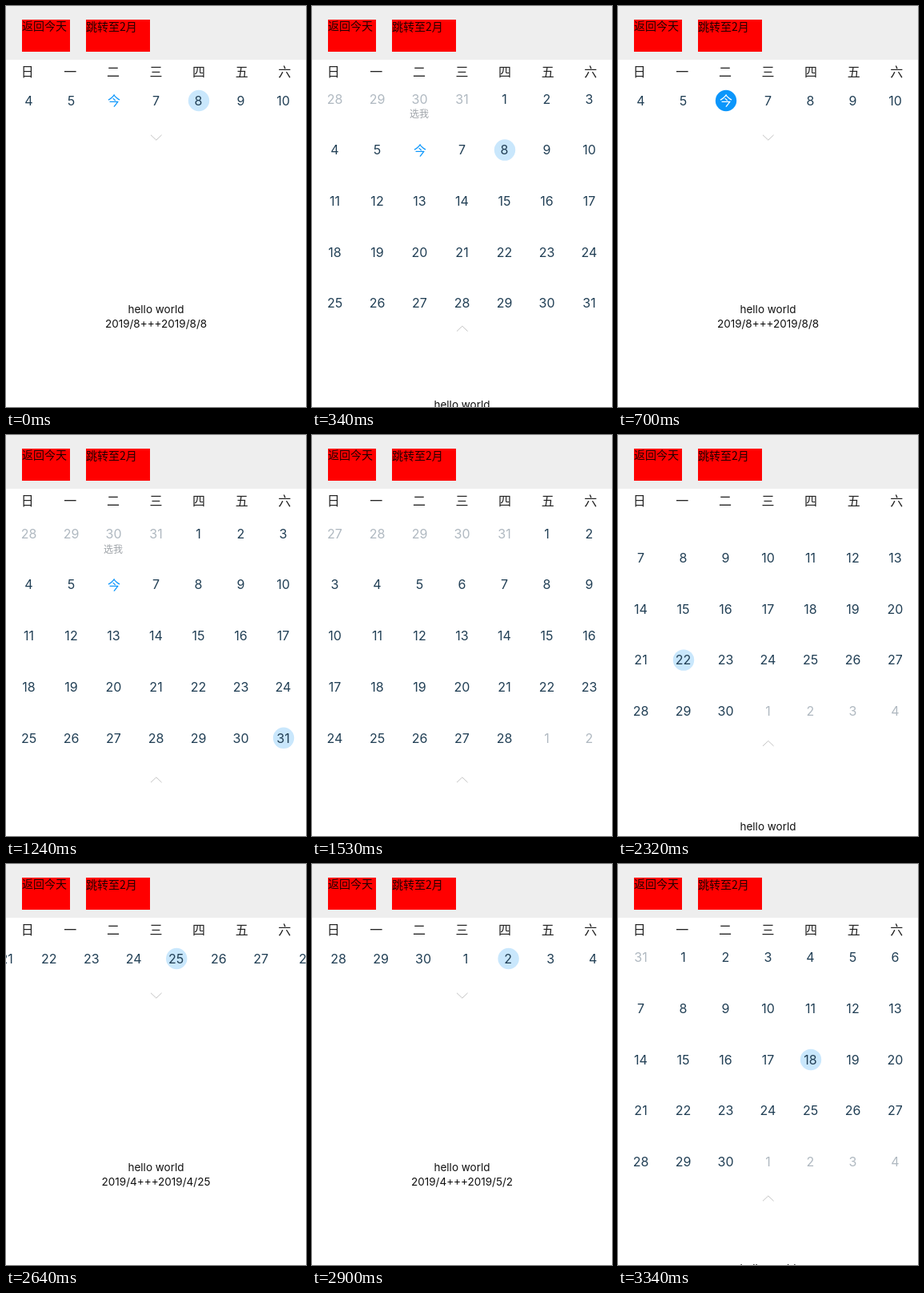
An HTML page with a canvas that plays this animation: 375 px wide and 500 px high, repeating every 3.36 s.

```html
<!DOCTYPE html>
<html lang="zh">
<head>
<meta charset="utf-8">
<style>
html, body { margin: 0; width: 100%; height: 100%; overflow: hidden; background: #fff; }
canvas { display: block; }
</style>
</head>
<body>
<canvas id="stage" width="375" height="500"></canvas>
<script>
const ctx = document.getElementById('stage').getContext('2d');
const LOOP = 3360, STEP = 20, PAGE = 375;
const COL = 53, ROW = 63.7, WEEK_Y = 118, MONTH_Y = 123;
const LATIN = 'Inter, sans-serif';
const CJK = '"Noto Sans CJK SC", "Noto Sans CJK", sans-serif';
const INK = '#213f55', MUTED = '#b0b9c1', BLUE = '#0b96fb', PALE = '#c9e7fc';

const day = (month, date) => new Date(2019, month - 1, date);
const TODAY = +day(8, 6);

// [start time, month, date]
const selections = [
  [0, 8, 8], [700, 8, 6], [1240, 8, 31], [2260, 4, 22],
  [2420, 4, 25], [2740, 5, 2], [3000, 4, 25], [3160, 4, 18]
];
const selectionAt = t => selections.filter(s => s[0] <= t).pop();

const ramp = (t, a, b) => Math.min(1, Math.max(0, (t - a) / (b - a)));
const smooth = (t, a, b) => { const u = ramp(t, a, b); return u * u * (3 - 2 * u); };
const easeOut = (t, a, b) => 1 - Math.pow(1 - ramp(t, a, b), 2.18);

// 1 = single week, 0 = whole month
function collapseAt(t) {
  return 1 - easeOut(t, 100, 200) + smooth(t, 320, 420) - easeOut(t, 880, 1080)
    + smooth(t, 2299, 2379) - easeOut(t, 3280, 3360);
}

function monthAt(t) {
  if (t < 1490) return 8;
  return 2 + 0.995 * smooth(t, 1840, 1960) + (t >= 2000 ? 0.005 : 0) + smooth(t, 2080, 2180);
}

const weekAt = t => smooth(t, 2620, 2740) - smooth(t, 2893, 3000) - smooth(t, 3060, 3160);

function text(str, x, y, size, color, font = LATIN, align = 'center') {
  ctx.font = `${size}px ${font}`;
  ctx.fillStyle = color;
  ctx.textAlign = align;
  ctx.fillText(str, x, y + size * (font === CJK ? 0.38 : 0.36));
}

function rect(x, y, w, h, color) {
  ctx.fillStyle = color;
  ctx.fillRect(x, y, w, h);
}

function drawDay(date, x, y, month, selected) {
  const isToday = +date === TODAY, isSelected = +date === selected;
  const muted = month && date.getMonth() + 1 !== month;
  if (isSelected) {
    ctx.fillStyle = isToday ? BLUE : PALE;
    ctx.beginPath();
    ctx.arc(x + 0.5, y, 13.2, 0, 7);
    ctx.fill();
  }
  if (isToday) text('今', x + 0.5, y, 16, isSelected ? '#fff' : BLUE, CJK);
  else text(date.getDate(), x, y, 16, muted ? MUTED : INK);
  if (+date === +day(7, 30)) text('选我', x - 0.5, y + 19, 12, '#a0a5aa', CJK);
}

function drawRows(first, rows, x, y, month, selected) {
  for (let i = 0; i < rows * 7; i++) {
    const date = new Date(first);
    date.setDate(date.getDate() + i);
    drawDay(date, x + 28.5 + i % 7 * COL, y + Math.floor(i / 7) * ROW, month, selected);
  }
}

function drawMonth(month, x, y, selected) {
  const lead = day(month, 1).getDay();
  const rows = Math.ceil((lead + day(month + 1, 0).getDate()) / 7);
  drawRows(day(month, 1 - lead), rows, x, y, month, selected);
}

// Draws the two pages around a fractional scroll position
function drawPages(position, drawPage) {
  const base = Math.floor(position);
  for (const page of [base, base + 1]) {
    const x = (page - position) * PAGE;
    if (x < PAGE) drawPage(page, x);
  }
}

function drawCalendar(t, q, arrowY) {
  const [, month, date] = selectionAt(t);
  const selected = +day(month, date);
  ctx.save();
  ctx.beginPath();
  ctx.rect(0, 97, 375, arrowY - 20 - 97);
  ctx.clip();
  if (t >= 2380 && t < 3300) {
    drawPages(weekAt(t), (page, x) => drawRows(day(4, 21 + page * 7), 1, x, WEEK_Y, 0, selected));
  } else {
    const row = Math.floor((date - 1 + day(month, 1).getDay()) / 7);
    const y = MONTH_Y + q * (WEEK_Y - MONTH_Y - row * ROW);
    drawPages(monthAt(t), (page, x) => drawMonth(page, x, y, selected));
  }
  ctx.restore();
}

function drawArrow(y, down) {
  const d = down ? 3.2 : -3.2;
  ctx.strokeStyle = '#c4c4c4';
  ctx.lineWidth = 1;
  ctx.beginPath();
  ctx.moveTo(181, y - d);
  ctx.lineTo(187.8, y + d);
  ctx.lineTo(194.6, y - d);
  ctx.stroke();
}

function draw(time) {
  const t = Math.floor(time / STEP) * STEP;
  const q = collapseAt(t);
  const extraRow = smooth(t, 1980, 2060) - smooth(t, 2180, 2240);
  const arrowY = 430 + ROW * extraRow - 266 * q;
  const footerY = 378 + (arrowY - 164) / 2;

  rect(0, 0, 375, 500, '#fff');
  drawCalendar(t, q, arrowY);
  drawArrow(arrowY, q > 0.5);

  const [, month, date] = selectionAt(t - STEP) || selections[0];
  text('hello world', 187.5, footerY, 13.5, '#111');
  text(`2019/${t < 1490 ? 8 : 4}+++2019/${month}/${date}`, 187.5, footerY + 18, 13.5, '#111');

  rect(0, 0, 375, 67, '#eee');
  rect(20, 17, 60, 40, '#f00');
  rect(100, 17, 80, 40, '#f00');
  text('返回今天', 20, 25, 14, '#200', CJK, 'left');
  text('跳转至2月', 100, 25.5, 14, '#200', CJK, 'left');
  [...'日一二三四五六'].forEach((name, i) => text(name, 26.8 + i * 375 / 7, 82, 16, '#222', CJK));
}

function tick() {
  draw(performance.now() % LOOP);
  requestAnimationFrame(tick);
}
tick();
</script>
</body>
</html>
```
